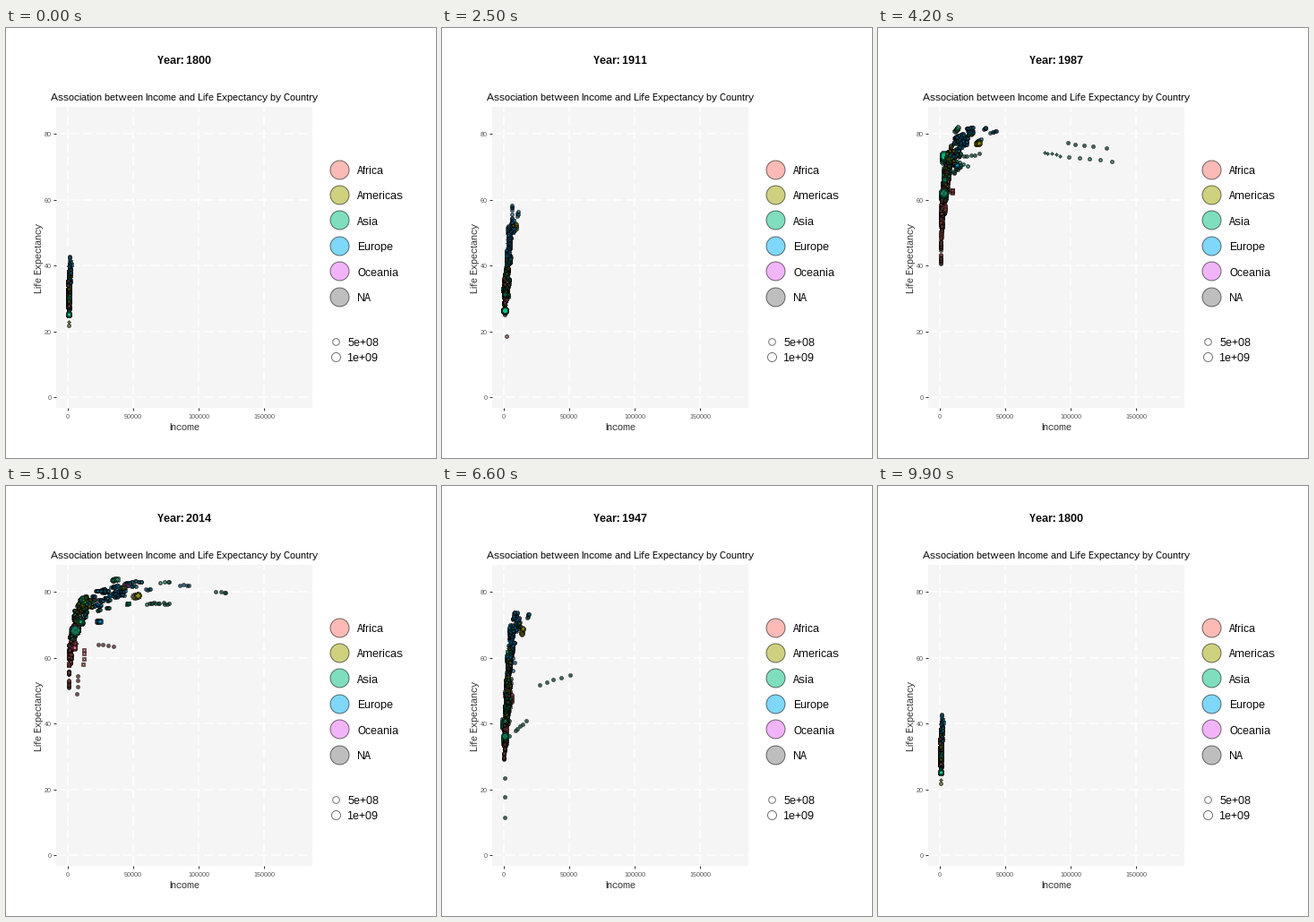
A matplotlib script for the animation above (10000 ms loop, 480 by 480 pixels).

```python
import numpy as np
import matplotlib.pyplot as plt
from matplotlib.animation import FuncAnimation
from matplotlib.colors import to_rgba

plt.rcParams.update({"font.family": "Liberation Sans", "text.hinting": "no_autohint",
                     "text.hinting_factor": 1})
rng = np.random.default_rng(12)

W = H = 480
STEPS = 50
YEARS = np.arange(1800, 2019)
SLOT = np.round((YEARS - 1800) * (STEPS - 1) / 218).astype(int)

COLORS = {"Africa": "#F8766D", "Americas": "#A3A500", "Asia": "#00BF7D",
          "Europe": "#00B0F6", "Oceania": "#E76BF3", "NA": "#7F7F7F"}
EDGE = (0, 0, 0, 0.55)


def px(income):
    return 69 + 0.00146 * np.asarray(income)


def py(life):
    return 412.3 - 3.675 * np.asarray(life)


def diameter(pop):
    """Circle width for a population in millions."""
    return 2 + 9.6 * np.sqrt(np.asarray(pop) / 1430)


# ---- data: every country is a few rules over time --------------------------
def sigmoid(mid, width):
    return 1 / (1 + np.exp((mid - YEARS) / width))


def bump(mid, width):
    return np.exp(-((YEARS - mid) / width) ** 2)


def drift(size, keep=0.8):
    out = np.zeros(len(YEARS))
    for i in range(1, len(out)):
        out[i] = keep * out[i - 1] + rng.normal(0, size)
    return out


CALM = 1 - sigmoid(1948, 3)
LIMIT = 48 + 36 * sigmoid(1930, 20)
countries = []


def country(region, pop, income, life, width=18, booms=(), dip=0):
    """income: 1800, 1947, 2014; life: start, end, middle year of the rise;
    booms: (year, income, width); dip: years of life lost around 2005."""
    growth = 2.6 if region == "Europe" else 6
    shrink = np.interp(YEARS, [1800, 1947, 2014], [1, 0.6, 0])
    money = np.exp(np.interp(YEARS, [1800, 1947, 2014, 2018],
                             np.log([*income, income[-1] * 1.06])))
    for year, peak, span in booms:
        money = money + peak * bump(year, span)
    start, end, mid = life
    age = start + (end - start) * sigmoid(mid, width) - dip * bump(2005, 7)
    age += drift(0.8 if region == "Europe" else 0.15) * CALM + drift(0.08)
    countries.append(dict(region=region, pop=pop / growth ** shrink,
                          income=money * np.exp(drift(0.012)),
                          life=np.minimum(age, LIMIT + rng.uniform(-1, 0.5))))


# large countries
country("Asia", 1390, (990, 620, 12800), (32, 77.5, 1964), 11)
country("Asia", 1295, (1050, 1000, 5700), (25, 70, 1966), 15)
country("Americas", 319, (2100, 14300, 52000), (37, 79.5, 1925), 22)
country("Europe", 143, (1430, 4900, 24500), (29.5, 71, 1936), 12)
country("Asia", 127, (1050, 2700, 36500), (36, 84.5, 1947), 15)
country("Europe", 81, (1640, 4500, 43500), (38, 81.5, 1932))
country("Europe", 64, (2700, 10500, 37500), (39, 82, 1927), 20)
country("Asia", 255, (760, 900, 10000), (30, 72, 1964), 14)
country("Americas", 203, (1200, 2400, 15500), (32, 77, 1951))
country("Africa", 176, (850, 1600, 5500), (30, 66, 1966), 20)
country("Africa", 54, (780, 6700, 12300), (33, 65, 1950), 15, dip=18)
country("Africa", 2, (620, 1400, 8000), (32, 58, 1950), 15, dip=24)
# rich countries
country("Europe", 5, (1900, 9500, 63500), (42, 83, 1928), 30)
country("Europe", 8, (2000, 18500, 56000), (38, 83.5, 1925), 20)
country("Europe", 10, (1450, 10300, 43500), (36, 82.5, 1917), 22)
country("Europe", 1, (1450, 12500, 93000), (38, 82.5, 1927), 20)
country("Oceania", 23, (815, 11500, 42800), (34, 82.5, 1922), 20)
country("Americas", 35, (1300, 11500, 42500), (38, 82, 1928), 20)
country("Asia", 5, (1000, 2900, 78000), (29, 84, 1946), 17)
# oil booms
country("Asia", 4, (1100, 1500, 1500), (26, 77.5, 1945), 17,
        [(1960, 105000, 12.6), (2006, 90000, 16)])
country("Asia", 2, (1000, 2500, 2500), (30, 80.2, 1962), 10,
        [(1975, 174000, 16.5), (2012, 120000, 14)])
country("Asia", 9, (1000, 2200, 2500), (30, 77, 1959), 13,
        [(1979, 150000, 14), (2020, 66000, 22)])
country("Asia", 0.4, (1200, 2500, 3000), (29, 77, 1948), 15,
        [(1980, 92000, 12), (2008, 76000, 18)])
country("Asia", 31, (900, 3000, 3000), (32, 77, 1964), 12,
        [(1977, 46000, 8), (2016, 45000, 18)])
country("Africa", 1, (650, 1100, 1500), (29, 66, 1970), 16, [(2008, 41000, 9)])

# count, incomes, income spread, life span, lag in years, end spread
REGIONS = {
    "Africa": (48, (800, 1450, 2800), 0.7, (31, 66.5, 1968), 11, 4),
    "Americas": (28, (1100, 3700, 12000), 0.5, (32.5, 77, 1950), 9, 2.2),
    "Asia": (34, (950, 2000, 9500), 0.75, (30.5, 75.5, 1960), 10, 3.2),
    "Europe": (36, (1500, 4900, 26000), 0.42, (36.5, 79.3, 1937), 8, 2.7),
    "Oceania": (8, (700, 2200, 4800), 0.5, (30, 69, 1955), 9, 3),
    "NA": (6, (900, 2200, 8000), 0.6, (31, 74, 1960), 9, 3),
}
for region, (count, income, spread, (start, end, mid), lag, dev) in REGIONS.items():
    for _ in range(count):
        z, extra = np.clip(rng.normal(size=2), -1.6, 1.6)
        q = 0.8 * z + 0.5 * extra
        country(region, np.clip(np.exp(rng.normal(1.8, 1.2)), 0.2, 90),
                income * np.exp(z * spread * np.array([0.55, 0.8, 1])),
                (start + 2.4 * extra, end + dev * q, mid - lag * q))
        life = countries[-1]["life"]
        if region != "Europe":
            bad = (rng.random(len(YEARS)) < 0.004) & (YEARS < 1950)
            life[bad] -= rng.uniform(3, 12, bad.sum())
        if region in ("Europe", "Asia") and rng.random() < 0.35:
            life -= rng.uniform(4, 17) * bump(1943, 2.5)

for c in countries:
    c["life"] -= rng.uniform(3, 15) * (YEARS == 1918)

# famines and epidemics, each in one poor country
for region, year, low in (("Africa", 1819, 1.5), ("Africa", 1867, 4), ("Africa", 1867, 8),
                          ("Oceania", 1875, 1), ("Oceania", 1918, 1), ("Asia", 1945, 11.3),
                          ("Asia", 1977, 18), ("Africa", 1994, 12.5)):
    poor = [c["life"] for c in countries if c["region"] == region
            and c["pop"][-1] < 25 and c["income"][-1] < 6000]
    life = poor[rng.integers(len(poor))]
    life += (low - life) * 0.75 ** abs(YEARS - year) * (abs(YEARS - year) < 3)

rng.shuffle(countries)
INCOME = np.array([c["income"] for c in countries])
LIFE = np.clip([c["life"] for c in countries], 1, 84)
POP = np.array([c["pop"] for c in countries])
FILL = np.array([to_rgba(COLORS[c["region"]], 0.5) for c in countries])

# ---- stage ----------------------------------------------------------------
fig = plt.figure(figsize=(W / 72, H / 72), dpi=72, facecolor="white")
ax = fig.add_axes([0, 0, 1, 1])
ax.set(xlim=(0, W), ylim=(H, 0))
ax.axis("off")


def label(x, y, text, size, **kw):
    kw = {"ha": "center", "color": "black", **kw}
    return ax.text(x, y, text, fontsize=size, va="baseline", **kw)


def centers(x, y):
    """Circles sit on whole pixels."""
    return np.floor(np.column_stack([x, y])) + 0.5


def dots(x, y, d, color, z=3):
    x, y = centers(x, y).T
    return ax.scatter(x, y, s=np.square(d), c=color, edgecolors=[EDGE],
                      linewidths=1, antialiased=False, zorder=z)


ax.add_patch(plt.Rectangle((56, 88), 286, 336, fc="#F5F5F5", ec="none", zorder=0))
grid = dict(color="white", lw=1.5, ls=(0, (7, 3)), dash_capstyle="butt", zorder=1)
tick = dict(color="#333333", lw=1, solid_capstyle="butt", zorder=1)
for v in range(0, 81, 20):
    y = py(v)
    ax.plot([56, 342], [y, y], **grid)
    ax.plot([53, 56], [y, y], **tick)
    label(51, y + 3, str(v), 7, ha="right", color="#4D4D4D")
for v in range(0, 150001, 50000):
    x = px(v)
    ax.plot([x, x], [424, 88], **grid)
    ax.plot([x, x], [424, 427], **tick)
    label(x, 436.5, str(v), 7, color="#4D4D4D")

label(199, 81, "Association between Income and Life Expectancy by Country", 11)
label(199, 449, "Income", 11, color="#333333")
label(39.5, 256.5, "Life Expectancy", 11, color="#333333", rotation=90,
      rotation_mode="anchor")

for i, (region, color) in enumerate(COLORS.items()):
    y = 157 + 28.4 * i
    dots([371.7], [y], 21, [to_rgba(color, 0.5)])
    label(392, y + 6, region, 12, ha="left")
for y, pop, name in ((349.5, 500, "5e+08"), (366, 1000, "1e+09")):
    dots([367.3], [y], diameter(pop), [(1, 1, 1, 0)])
    label(381, y + 5.5, name, 12, ha="left")

year_text = label(199, 40, "", 12, fontweight="bold")
cloud = dots([0], [0], 1, [(1, 1, 1, 0)], z=2)


def draw(i):
    step = min(i, 2 * STEPS - 1 - i)
    now = SLOT == step
    year_text.set_text(f"Year: {1800 + step * 218 / (STEPS - 1):.0f}")
    pick = lambda table: table[:, now].T.ravel()
    cloud.set_offsets(centers(px(pick(INCOME)), py(pick(LIFE))))
    cloud.set_sizes(diameter(pick(POP)) ** 2)
    cloud.set_facecolors(np.tile(FILL, (now.sum(), 1)))
    return cloud, year_text


anim = FuncAnimation(fig, draw, frames=2 * STEPS, interval=100, repeat=True,
                     repeat_delay=0, blit=False)
plt.show()
```
